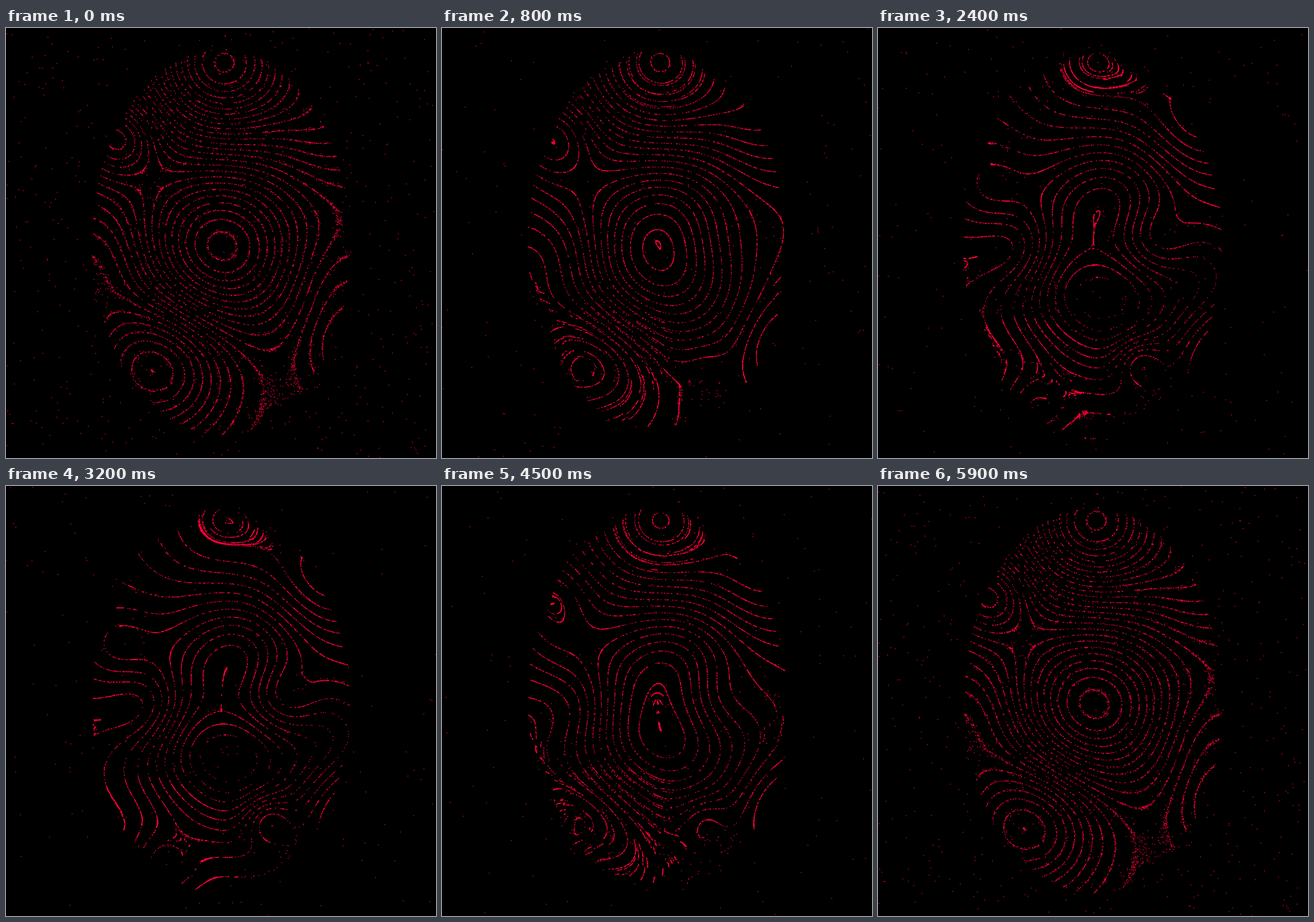
Animation, 748 px wide and 748 px high, one loop 6 s. Source, as an HTML page with a canvas:

```html
<!DOCTYPE html>
<html lang="en">
<head>
<meta charset="utf-8">
<title>Fingerprint</title>
<style>
html, body { margin: 0; width: 100%; height: 100%; overflow: hidden; background: #000; }
canvas { display: block; width: 748px; height: 748px; }
</style>
</head>
<body>
<canvas id="stage" width="748" height="748"></canvas>
<script>
const start = performance.now();
const SIZE = 748, COUNT = 8500, STEPS = 30, STEP_MS = 100, WARMUP = 5;
const OVAL = { x: 374, y: 373, rx: 224, ry: 335 };
const BASE = 11.2;

// Hills and hollows of the height field; each height eases between two values.
const hill = (x, y, radius, from, to) => ({ x, y, radius, from, to });
const hills = [
  hill(372, 385, 95, -11, 0),    // single whorl
  hill(380, 465, 110, 0, -11),   // the two whorls it splits into
  hill(405, 290, 75, 0, -4.5),
  hill(374, 385, 45, 0, 2.5),    // neck between them
  hill(475, 370, 50, 0, 5),
  hill(250, 385, 50, 0, 4),
  hill(378, 60, 90, 15, 4),      // rim
  hill(565, 160, 75, 4, 5.5),
  hill(195, 190, 50, -7, 0),
  hill(195, 280, 50, 0, -2.5),
  hill(160, 400, 70, 4, 1.5),
  hill(260, 590, 90, 10, 2),
  hill(268, 660, 45, 0, -4),
  hill(455, 580, 30, 0, 4),
  hill(565, 440, 60, 2, -2.5),
  hill(600, 560, 60, 4, 3)
];

let seed = 20417;
function random() {
  seed = (seed + 0x6D2B79F5) | 0;
  let t = Math.imul(seed ^ (seed >>> 15), 1 | seed);
  t = (t + Math.imul(t ^ (t >>> 7), 61 | t)) ^ t;
  return ((t ^ (t >>> 14)) >>> 0) / 4294967296;
}

const ease = k => Math.sin(Math.PI * k / (STEPS * 2 - 1)) ** 1.4;
const inside = (x, y) => ((x - OVAL.x) / OVAL.rx) ** 2 + ((y - OVAL.y) / OVAL.ry) ** 2 < 1;

// Height and slope at a point.
function field(x, y, e) {
  let h = BASE, gx = 0, gy = 0;
  for (const b of hills) {
    const dx = x - b.x, dy = y - b.y, r2 = b.radius * b.radius;
    const v = (b.from + (b.to - b.from) * e) * Math.exp(-(dx * dx + dy * dy) / (2 * r2));
    h += v;
    gx -= v * dx / r2;
    gy -= v * dy / r2;
  }
  return { h, gx, gy };
}

const dots = new Float32Array(COUNT * 2);
function scatter(i) {
  dots[i] = random() * SIZE;
  dots[i + 1] = random() * SIZE;
}

// Dots in the oval slide to the nearest whole-number height; the others jump anywhere.
function advance(e, gain, loss) {
  for (let i = 0; i < dots.length; i += 2) {
    const x = dots[i], y = dots[i + 1];
    if (!inside(x, y) || random() < loss) {
      scatter(i);
      continue;
    }
    const { h, gx, gy } = field(x, y, e);
    let pull = gain * (Math.round(h) - h) / (gx * gx + gy * gy + 0.0003);
    const length = Math.abs(pull) * Math.hypot(gx, gy);
    if (length > 7) pull *= 7 / length;
    dots[i] += gx * pull;
    dots[i + 1] += gy * pull;
  }
}

for (let i = 0; i < dots.length; i += 2) scatter(i);
for (let n = 0; n < WARMUP; n++) advance(0, 0.55, 0);
const poses = [dots.slice()];
for (let k = 1; k < STEPS; k++) {
  advance(ease(k), 0.75, 0.003);
  poses.push(dots.slice());
}

const ctx = document.getElementById("stage").getContext("2d");
function draw(pose) {
  ctx.fillStyle = "#000";
  ctx.fillRect(0, 0, SIZE, SIZE);
  ctx.fillStyle = "rgba(255, 0, 56, 0.9)";
  for (let i = 0; i < pose.length; i += 2) ctx.fillRect(pose[i] - 0.75, pose[i + 1] - 0.75, 1.5, 1.5);
}

// Plays the poses forwards, then backwards.
let shown = -1;
function tick() {
  const step = Math.floor((performance.now() - start) / STEP_MS) % (STEPS * 2);
  const k = Math.min(step, STEPS * 2 - 1 - step);
  if (k !== shown) draw(poses[shown = k]);
  requestAnimationFrame(tick);
}
tick();
</script>
</body>
</html>
```
